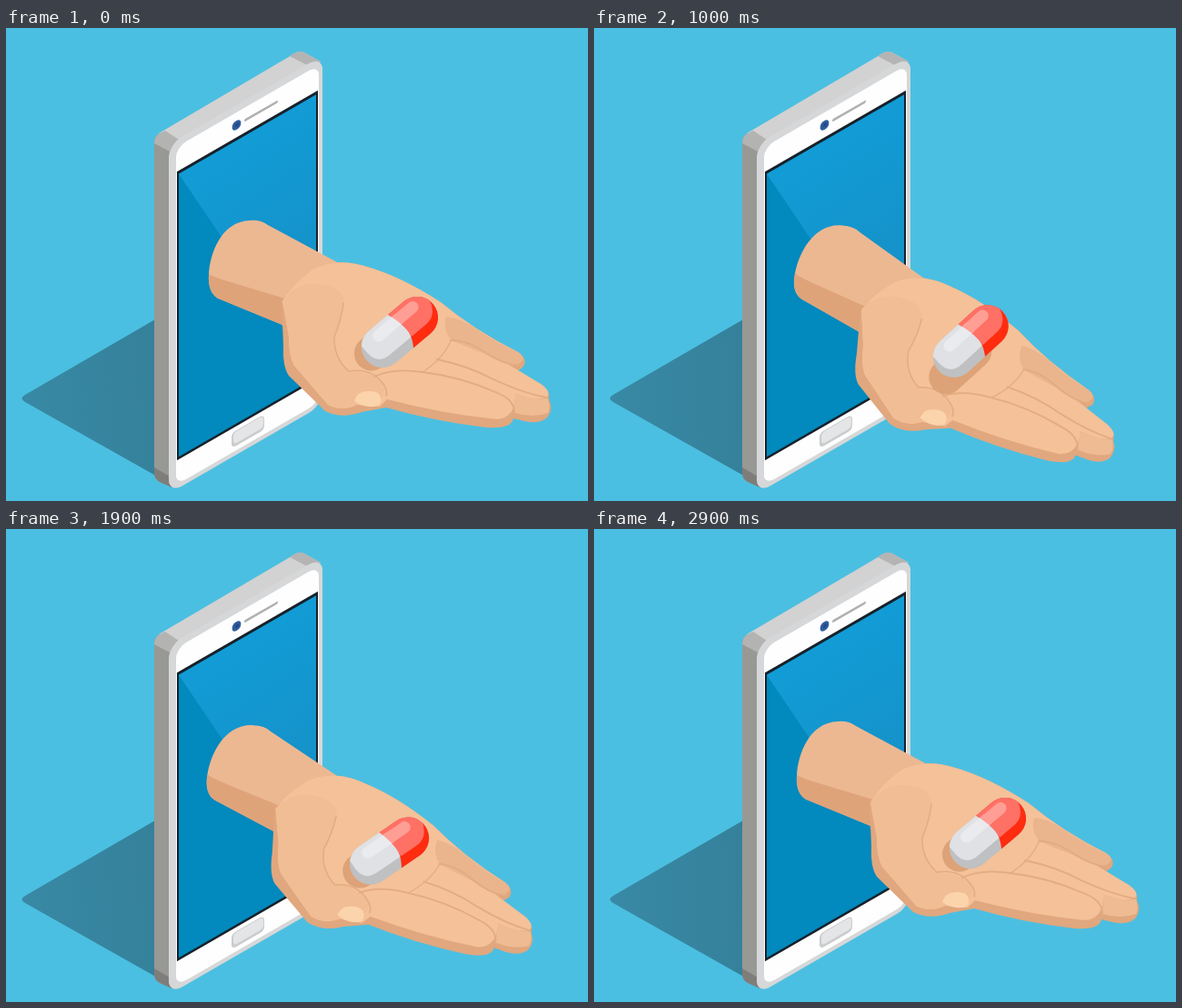
Write an HTML page with a canvas that moves like this. It is 640 px wide and 521 px high and loops after 3 s.

```html
<!DOCTYPE html>
<html lang="en">
<head>
<meta charset="utf-8">
<title>Phone, hand and capsule</title>
<style>
html, body { margin: 0; width: 100%; height: 100%; overflow: hidden; background: #4bbfe1; }
canvas { display: block; }
</style>
</head>
<body>
<canvas id="stage" width="640" height="521"></canvas>
<script>
const ctx = document.getElementById('stage').getContext('2d');
const LOOP = 3000, STEP = 100, RAD = Math.PI / 180;
const ISO = Math.tan(30 * RAD);
const armPivot = { x: 227, y: 255 }, palmPivot = { x: 227, y: 228 };
const seat = { x: 206, y: 107 };     // capsule's place, relative to the palm pivot
const SEAT_ANGLE = -40;

// turning points of the hand: [step, degrees], eased in between
const swing = [[0, 0], [2, 11.2], [3, 7.3], [4, 7.3], [7, -7.2], [10, 7.3], [12, -7.2],
               [15, 0], [18, 0], [20, 11.2], [23, -4], [27, 11], [29, 0]];

const tosses = [
  { from: 5.7, to: 10.4, height: 49 },
  { from: 11.2, to: 14.8, height: 185 },
  { from: 22, to: 27, height: 252, spinFrom: 20 }
];

function handAngle(step) {
  const i = Math.max(1, swing.findIndex(key => key[0] >= step));
  const [t0, a0] = swing[i - 1], [t1, a1] = swing[i];
  const k = (step - t0) / (t1 - t0);
  return a0 + (a1 - a0) * (1 - Math.cos(Math.PI * k)) / 2;
}

// height, sideways drift and turn of the capsule relative to the palm
function flight(step) {
  const pose = { lift: 0, drift: 0, turn: 0 };
  for (const { from, to, height, spinFrom } of tosses) {
    const start = spinFrom ?? from;
    if (step < start || step > to) continue;
    const k = Math.max(0, (step - from) / (to - from));
    const arc = 4 * k * (1 - k);
    pose.lift = height * arc;
    pose.drift = -11 * arc;
    pose.turn = spinFrom ? 360 * ((step - start) / (to - start)) ** 2 : 19 * Math.sin(2 * Math.PI * k);
  }
  return pose;
}

function fill(d, color) {
  ctx.fillStyle = color;
  ctx.fill(new Path2D(d));
}

function line(d, color, width) {
  ctx.strokeStyle = color;
  ctx.lineWidth = width;
  ctx.lineCap = ctx.lineJoin = 'round';
  ctx.stroke(new Path2D(d));
}

function box(x, y, w, h, r, color) {
  ctx.fillStyle = color;
  ctx.beginPath();
  ctx.roundRect(x, y, w, h, r);
  ctx.fill();
}

function pill(x, y, length, width) {
  ctx.beginPath();
  ctx.roundRect(x - length / 2, y - width / 2, length, width, width / 2);
}

function disc(x, y, r, color) {
  ctx.fillStyle = color;
  ctx.beginPath();
  ctx.arc(x, y, r, 0, 2 * Math.PI);
  ctx.fill();
}

function gradient(x0, y0, x1, y1, from, to) {
  const g = ctx.createLinearGradient(x0, y0, x1, y1);
  g.addColorStop(0, from);
  g.addColorStop(1, to);
  return g;
}

function turned(pivot, degrees, paint) {
  ctx.save();
  ctx.translate(pivot.x, pivot.y);
  ctx.rotate(degrees * RAD);
  ctx.translate(-pivot.x, -pivot.y);
  paint();
  ctx.restore();
}

function drawPhone() {
  fill('M164 321 L21 404 Q14 408 21 412 L168 495 Z', gradient(20, 408, 165, 400, '#3889a5', '#35819b'));

  // left side, top side and their rounded corners
  fill('M163 126 Q163 119 169 116 L188 127 V507 L169 500 Q163 497 163 490 Z', '#989895');
  fill('M168 116 L314 30 Q322 24 328 27 L346 37 L188 130 Z', '#d2d2d2');
  fill('M163 127 Q163 119 169 116 L175 113 L190 123 L180 136 Z', '#b3b3b2');
  fill('M312 31 Q321 24 328 27 L346 37 L335 43 Z', '#b4b4b4');
  fill('M163 484 L180 494 L182 506 L169 500 Q163 497 163 490 Z', '#7f7d7a');

  // front, drawn flat in the slanted plane
  ctx.save();
  ctx.transform(1, -ISO, 0, 1, 179, 0);
  box(0, 128, 169, 385, 15, '#d6d7d8');
  box(8, 136, 157, 372, 11, '#fefefe');
  box(9, 163.5, 155, 318, 0, '#17212a');
  box(11, 167, 151, 311.5, 0, '#0289bd');
  fill('M11 167 H162 V478.5 Z', gradient(120, 160, 140, 400, '#129cd6', '#168fc5'));
  disc(74.5, 150, 4.9, '#2f5c9e');
  disc(75, 150, 2.2, '#264887');
  box(83, 148.6, 37, 2.8, 1.4, '#b0b0b1');
  box(69, 486, 36, 17, 5, '#cbcccd');
  box(71, 487, 33, 13, 4, '#e4e5e6');
  ctx.restore();
}

function drawForearm() {
  fill('M223 272 C224 248 237 213 268 212 Q280 211 288 217 L366 259 L345 330 L304 327 L236 299 C226 296 222 285 223 272 Z', '#ecb892');
  fill('M223 271 Q230 275 244 279 L320 302 L316 332 L236 299 C226 296 222 284 223 271 Z', '#dfa37a');
}

function drawPalm() {
  const skin = '#f4c199', edge = '#e1a77e', crease = '#e3ab82';

  // rim under thumb and fingers, then the lit surface
  fill('M303 302 Q313 284 334 268 C349 257 374 255 397 263 Q435 274 478 302 Q515 333 563 357 Q574 364 569 373 L562 378 L588 392 Q599 400 597 409 Q602 419 596 428 Q588 437 570 433 L558 430 Q556 442 528 440 Q470 433 418 418 L391 423 Q369 431 351 422 L311 383 Q304 373 305 350 Z', edge);
  fill('M304 301 Q313 284 334 268 C349 257 374 255 397 263 Q435 274 478 302 Q515 333 563 357 Q573 364 564 369 L550 369 L588 392 Q601 401 594 407 Q582 411 560 403 Q561 429 540 431 Q480 425 419 409 L411 417 L386 415 Q370 423 354 415 L317 372 Q311 362 311 340 Z', skin);

  // thumb mound, far finger and nearest fingertip
  fill('M304 301 Q316 284 336 282 Q369 282 372 302 Q369 322 360 339 Q358 360 376 378 Q405 377 417 397 L411 412 L386 414 Q370 423 354 415 L317 372 Q311 362 311 340 Z', '#f1bd95');
  fill('M484 318 Q500 319 521 334 Q542 348 563 357 Q573 364 564 370 Q552 374 527 359 Q503 350 490 344 Q480 333 484 318 Z', '#eab58d');
  fill('M560 403 Q580 410 596 408 Q599 418 596 424 Q580 430 559 424 Z', '#efbb92');

  line('M371 303 Q369 321 361 340 Q360 363 377 378 Q401 374 414 391 Q420 398 418 405', crease, 1.5);
  line('M405 384 Q425 374 458 379 Q500 384 538 401 Q560 409 559 425', crease, 1.8);
  line('M458 379 Q480 365 489 345', crease, 1.2);
  line('M474 365 Q508 372 536 387 Q568 402 594 407', crease, 1.8);
  line('M489 344 Q506 343 528 358 Q552 373 566 371', crease, 2);
  fill('M383 411 Q386 400 398 400 Q410 399 412 407 Q414 416 404 417 Q393 418 383 411 Z', '#fcd4ac');
}

function drawCapsule() {
  pill(0, 0, 96, 46);
  ctx.clip();
  fill('M-50 -25 H55 V25 H-50 Z', '#bfc0c1');
  fill('M-42 -25 H12 V12 H-25 Q-41 12 -42 -5 Z', '#e0e1e4');
  fill('M2 -25 C6 -10 15 4 -1 25 H50 V-25 Z', '#ff2c10');
  fill('M2 -25 C5 -14 9 -2 7 12 H28 Q43 12 48 -6 V-25 Z', '#ff7065');
  pill(4, -12, 62, 13);
  ctx.clip();
  fill('M-30 -25 H10 V0 H-30 Z', '#eaebee');
  fill('M2 -25 Q6 -12 8 0 H40 V-25 Z', '#ff9e94');
}

function placed(x, y, degrees, paint) {
  ctx.save();
  ctx.translate(x, y);
  ctx.rotate(degrees * RAD);
  paint();
  ctx.restore();
}

function draw(time) {
  const step = Math.floor(time % LOOP / STEP);
  const hand = handAngle(step);
  const { lift, drift, turn } = flight(step);
  const cos = Math.cos(hand * RAD), sin = Math.sin(hand * RAD);
  const x = palmPivot.x + seat.x * cos - seat.y * sin;
  const y = palmPivot.y + seat.x * sin + seat.y * cos;
  const tilt = SEAT_ANGLE + hand + turn;

  ctx.fillStyle = '#4bbfe1';
  ctx.fillRect(0, 0, 640, 521);
  drawPhone();
  turned(armPivot, hand, drawForearm);
  turned(palmPivot, hand, drawPalm);
  placed(x - 15, y + 10, tilt, () => {
    ctx.fillStyle = '#dda277';
    pill(0, 0, 80, 38);
    ctx.fill();
  });
  placed(x + drift, y - lift, tilt, drawCapsule);
}

const start = performance.now();
function tick() {
  draw(performance.now() - start);
  requestAnimationFrame(tick);
}
tick();
</script>
</body>
</html>
```
